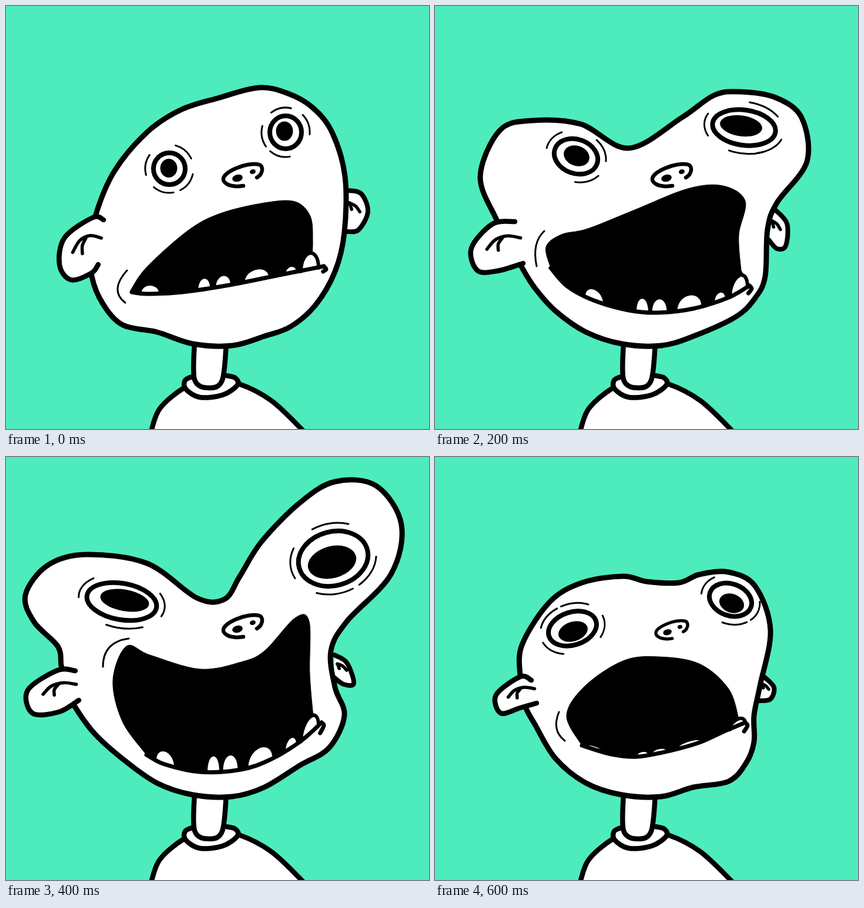
These frames come from a looping animation (720 by 720 pixels, 700 ms). An HTML page:

```html
<!DOCTYPE html>
<html lang="en">
<head>
<meta charset="utf-8">
<title>Wobbly head</title>
<style>
  html, body { margin: 0; width: 100%; height: 100%; overflow: hidden; background: #4eebbd; }
  svg { display: block; width: 100vw; height: 100vh; }
  path, ellipse { stroke: #000; stroke-linecap: round; stroke-linejoin: round; }
</style>
</head>
<body>
<svg id="stage" viewBox="0 0 720 720"></svg>
<script>
const STEP = 100;
const stage = document.getElementById("stage");

// Parts that keep their shape while the head stretches
const BODY = "247,724 262,685 303,650 345,635 396,643 452,672 507,724";
const COLLAR = "320,630 305,637 306,652 330,666 369,662 394,645 390,633 374,629";
const NECK = "321,570 321,636 346,650 368,637 375,575";
const CHIN = "440,562 385,578 318,575 257,555";
const NOSE = "1,17 -11,18 -25,15 -33,7 -28,-3 -11,-13 9,-19 28,-19 33,-12 30,-2 24,3";
// Fractions of an ear's box
const EAR_FOLDS = ["0.95,.33 .7,.29 .46,.37 .3,.56", ".6,.33 .52,.45 .52,.58"];
const FAR_FOLDS = [".17,.3 .45,.38 .64,.52", ".2,.33 .27,.46"];

// Each pose gives a few key points per outline, from left to right.
// eyes: [cx, cy, rx, ry, turn, pupil dx, pupil dy, ...crease angles]
const poses = [
  {
    skull: "152,358 184,282 240,215 297,177 360,157 430,139 480,149 522,173 555,215 577,290 576,385 560,452 526,510 484,546",
    jaw: "199,543 165,507 146,460 145,410",
    ear: "166,364 148,360 100,394 91,440 110,466 145,455 157,440",
    farEar: "578,314 604,319 616,350 600,381 580,384",
    eyes: [[278, 277, 27, 27, 0, -1, -1, 190, -50, 38, 105], [476, 215, 27, 28, 0, -2, -2, -102, -20, 170, 105]],
    cheek: "206,450 190,481 203,505",
    mouth: "212,484 240,444 310,382 365,353 440,335 492,333 518,358 522,400 520,440",
    lip: "214,487 240,490 300,487 380,475 470,457 541,443",
    curl: 9, growth: 1, spread: 1.12
  },
  {
    skull: "121,362 133,280 180,212 255,188 302,200 350,212 390,199 440,152 485,131 528,127 575,145 614,174 620,222 583,328 570,385 562,480 544,515 500,547",
    jaw: "205,508 165,455 140,410",
    ear: "166,372 115,367 76,398 82,434 105,443 166,449",
    farEar: "582,335 602,360 604,392 588,402 573,392",
    eyes: [[256, 265, 32, 33, 0, -1, -2, 180, -95, -28, 90], [500, 208, 38, 29, -12, 0, -3, -85, 190, 10, 135]],
    cheek: "203,442 197,482 226,501",
    mouth: "212,484 223,453 265,397 340,349 430,317 495,316 532,340 530,385 520,415 520,455",
    lip: "213,484 260,498 330,506 400,503 460,495 538,477",
    curl: 12, growth: .85
  },
  {
    skull: "104,362 77,290 110,212 165,195 248,201 330,242 420,190 475,152 520,146 580,156 624,190 633,265 582,335 566,380 562,460 545,497 512,529",
    jaw: "205,519 170,480 148,445 125,400",
    ear: "136,367 98,371 62,412 72,450 106,451 150,438",
    farEar: "577,345 599,370 597,408 582,413 568,398",
    eyes: [[240, 256, 38, 29, 20, 1, -1, 200, -38, 50], [526, 207, 54, 30, 8, -5, -3, -62, 175, 82, 40]],
    cheek: "186,383 172,408 173,443",
    mouth: "197,446 189,410 215,389 260,379 340,347 430,311 490,306 528,332 517,390 521,450",
    lip: "197,446 225,477 270,501 330,518 380,522 440,515 500,496 535,476",
    curl: 13, growth: 1.25
  },
  {
    skull: "100,362 80,295 80,212 130,175 200,191 280,215 345,212 405,182 440,149 485,108 560,84 625,96 661,150 640,216 580,288 560,355 562,450 545,490 500,525",
    jaw: "210,510 170,465 145,428 118,395",
    ear: "133,375 85,362 55,400 70,430 115,419 149,427",
    farEar: "567,342 590,346 606,382 592,397 565,382",
    eyes: [[219, 253, 48, 31, 17, 1, -1, 200, -18, 75], [542, 190, 59, 40, -6, -4, 4, -82, 182, 22, 92]],
    cheek: "180,369 192,340 223,335",
    mouth: "203,455 189,385 205,353 270,358 360,352 435,329 478,299 502,302 514,330 508,410 516,452",
    lip: "203,455 235,487 290,515 350,529 400,529 450,517 500,492 535,466",
    curl: 22, growth: 1.45
  },
  {
    skull: "94,355 88,322 48,281 33,235 70,185 135,166 240,181 325,240 372,242 398,203 435,144 500,78 560,42 630,49 673,115 655,200 580,280 553,330 560,392 576,440 550,495 500,525",
    jaw: "200,515 150,470 116,423 100,390",
    ear: "118,364 88,363 37,397 45,436 90,434 124,414",
    farEar: "559,337 580,350 592,385 575,387 558,375",
    eyes: [[197, 246, 60, 31, 10, 5, -2, 198, -8, 80], [557, 173, 60, 46, -15, -2, 6, -82, 190, 40, 100]],
    cheek: "165,357 176,324 209,309",
    mouth: "239,507 198,450 182,380 205,322 245,337 330,361 400,349 440,330 492,274 516,280 517,370 524,452",
    lip: "239,507 270,523 330,536 400,532 450,515 500,485 537,452",
    curl: 18, growth: 1.45
  },
  {
    skull: "110,362 101,285 140,190 220,159 290,177 350,193 410,178 480,130 550,110 605,130 624,175 576,282 560,350 556,435 540,480 500,523",
    jaw: "215,531 165,475 135,422 118,395",
    ear: "134,366 100,370 66,405 76,439 110,440 150,414",
    farEar: "566,348 579,368 570,383 560,382",
    eyes: [[181, 236, 39, 28, -15, 1, -5, 10, 145, 85], [560, 169, 52, 33, -14, 16, 6, -125, 180, 92]],
    cheek: "200,362 183,380 178,423",
    mouth: "250,497 215,470 201,410 222,367 300,354 390,328 495,310 530,333 532,370 520,420 521,450",
    lip: "250,497 300,504 350,507 400,504 450,497 500,487 539,462",
    curl: 0, growth: .85
  },
  {
    skull: "145,375 148,320 195,247 250,214 320,203 360,212 415,214 450,200 500,196 545,220 571,295 553,390 543,440 543,485 530,520 500,552",
    jaw: "205,513 170,455 155,428 147,400",
    ear: "164,380 145,374 104,405 112,436 145,427 173,419",
    farEar: "560,374 577,392 571,412 552,415",
    eyes: [[234, 292, 42, 28, -18, 1, 5, -130, -72, 18, 145], [503, 243, 37, 27, 20, 2, 6, -165, 5, 65]],
    cheek: "211,434 207,462 221,483",
    mouth: "250,491 224,440 255,390 320,347 380,340 450,352 500,395 518,450",
    lip: "250,491 300,506 345,510 400,500 450,486 490,468 528,452",
    curl: 15, growth: .4, nose: "translate(403 295) scale(.82)"
  }
];

const points = text => text.trim().split(/\s+/).map(p => p.split(",").map(Number));

// Catmull-Rom curve as path data, without the leading move
function curve(pts, closed) {
  const n = pts.length;
  const at = i => closed ? pts[(i + n) % n] : pts[Math.max(0, Math.min(n - 1, i))];
  let d = pts[0].join();
  for (let i = 0; i < (closed ? n : n - 1); i++) {
    const [a, b, c, e] = [at(i - 1), at(i), at(i + 1), at(i + 2)];
    const c1 = b.map((v, k) => v + (c[k] - a[k]) / 6);
    const c2 = c.map((v, k) => v - (e[k] - b[k]) / 6);
    d += `C${c1} ${c2} ${c}`;
  }
  return d + (closed ? "Z" : "");
}

const path = (d, fill, width) => `<path d="M${d}" fill="${fill}" stroke-width="${width}"/>`;
const line = (text, width, fill = "none") => path(curve(points(text)), fill, width);
const blob = (text, fill, width) => path(curve(points(text), true), fill, width);
const oval = (x, y, rx, ry, turn, fill, width) =>
  `<ellipse rx="${rx}" ry="${ry}" transform="translate(${x} ${y}) rotate(${turn})" fill="${fill}" stroke-width="${width}"/>`;

// Parabola through three points
function bow(text, width) {
  const [a, m, b] = points(text);
  return path(`${a}Q${m.map((v, k) => 2 * v - (a[k] + b[k]) / 2)} ${b}`, "none", width);
}

function folds(ear, templates) {
  const axes = [0, 1].map(k => points(ear).map(p => p[k]));
  const low = axes.map(v => Math.min(...v));
  const size = axes.map((v, k) => Math.max(...v) - low[k]);
  return templates.map(t =>
    path(curve(points(t).map(p => p.map((v, k) => low[k] + v * size[k]))), "none", 5.5)).join("");
}

function drawEye([x, y, rx, ry, turn, dx, dy, ...angles]) {
  const gap = 14, sweep = 25;
  const rim = deg => {
    const a = deg * Math.PI / 180;
    return [(rx + gap) * Math.cos(a), (ry + gap) * Math.sin(a)];
  };
  const creases = angles.map(a =>
    path(`${rim(a - sweep)}A${rx + gap} ${ry + gap} 0 0 1 ${rim(a + sweep)}`, "none", 3)).join("");
  // Stretched eyes get wider pupils
  const wide = rx * (.4 + rx * .005);
  return `<g transform="translate(${x} ${y}) rotate(${turn})">${creases}</g>` +
    oval(x, y, rx, ry, turn, "#fff", 8) +
    oval(x + dx, y + dy, wide, ry * .59, turn, "#000", 0);
}

function drawNose(place = "translate(403 289)") {
  return `<g transform="${place}">` + line(NOSE, 6.5) +
    oval(-9, 4, 9, 6, -15, "#000", 0) + oval(17, -7, 5, 4, -15, "#000", 0) + "</g>";
}

function drawMouth({ mouth, lip, curl, growth, spread = 1 }) {
  const edge = points(lip);
  const end = edge[edge.length - 1];

  const lipY = x => {
    const i = Math.max(1, edge.findIndex(p => p[0] >= x));
    const [[x0, y0], [x1, y1]] = [edge[i - 1], edge[i]];
    return y0 + (y1 - y0) * (x - x0) / (x1 - x0);
  };
  const tooth = (x, width, height, outline) => {
    const [l, r] = [x - width / 2, Math.min(x + width / 2, end[0])];
    const [yl, yr] = [lipY(l) + 1, lipY(r) + 1];
    const lift = height * 4 / 3;
    return path(`${l},${yl}C${l},${yl - lift} ${r},${yr - lift} ${r},${yr}`, "#fff", outline);
  };

  const gap = curve(edge.slice().reverse());
  const teeth = [[271, 30, 14], [353, 20, 18], [382, 25, 18], [433, 41, 18], [485, 18, 11]]
    .map(([x, w, h]) => tooth(485 - (485 - x) * spread, w, h * growth, 0)).join("");
  const fang = tooth(517, 30, 28 * Math.min(1, growth * 1.1), 6);
  const [x, y] = end;
  const hook = curl ? line(`${end} ${x + 4},${y + 5} ${x - curl / 8},${y + curl}`, 7) : "";
  return path(curve(points(mouth)) + "L" + gap + "Z", "#000", 1) + teeth + fang + line(lip, 7) + hook;
}

function drawPose(p) {
  return [
    line(BODY, 8.5, "#fff"), line(COLLAR, 8.5, "#fff"), line(NECK, 8.5, "#fff"),
    line(p.farEar, 8, "#fff"), folds(p.farEar, FAR_FOLDS),
    blob([p.skull, CHIN, p.jaw].join(" "), "#fff", 9),
    line(p.ear, 8.5, "#fff"), folds(p.ear, EAR_FOLDS),
    p.eyes.map(drawEye).join(""), bow(p.cheek, 3),
    drawNose(p.nose), drawMouth(p)
  ].join("");
}

stage.innerHTML = poses.map(p => `<g display="none">${drawPose(p)}</g>`).join("");
const groups = [...stage.children];
const start = performance.now();

function tick() {
  const now = Math.floor((performance.now() - start) / STEP) % groups.length;
  groups.forEach((g, i) => g.setAttribute("display", i === now ? "inline" : "none"));
  requestAnimationFrame(tick);
}
tick();
</script>
</body>
</html>
```
